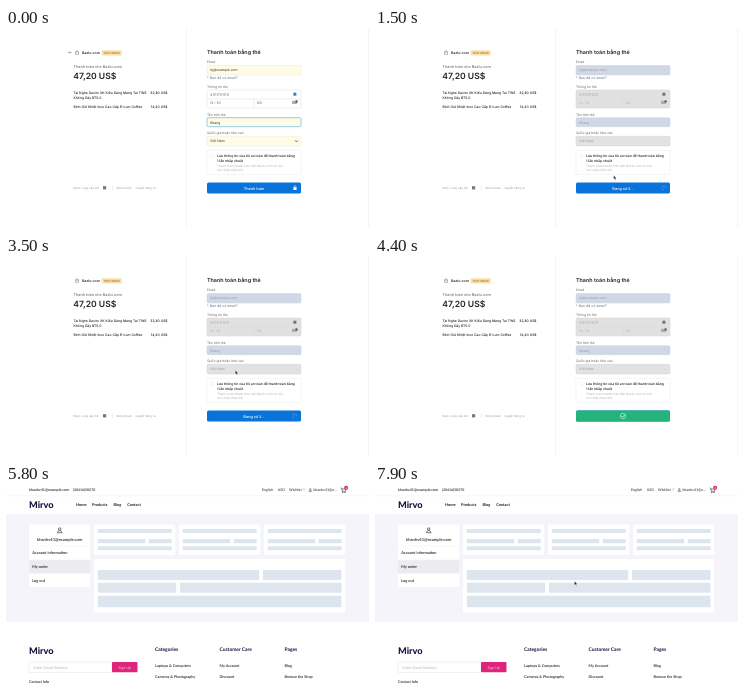
An HTML page that plays this animation: 363 by 200 pixels, repeating every 8 s.

```html
<!DOCTYPE html>
<html lang="vi">
<head>
<meta charset="utf-8">
<title>Checkout</title>
<style>
html, body { margin: 0; width: 100%; height: 100%; overflow: hidden; background: #fff; }
svg { display: block; width: 363px; height: 200px; text-rendering: geometricPrecision; }
#pay { font-family: Inter, "Noto Sans", sans-serif; }
#shop { font-family: Lato, "Open Sans", sans-serif; }
</style>
</head>
<body>
<svg id="stage" viewBox="0 0 363 200" xmlns="http://www.w3.org/2000/svg"></svg>
<script>
const LOOP = 8000, STEP = 100;

const text = (x, y, size, str, fill = '#222', weight = 400, anchor = 'start') =>
  `<text x="${x}" y="${y}" font-size="${size}" fill="${fill}" font-weight="${weight}" text-anchor="${anchor}">${str.replace(/&/g, '&amp;')}</text>`;
const box = (x, y, w, h, fill, extra = '') =>
  `<rect x="${x}" y="${y}" width="${w}" height="${h}" fill="${fill}" ${extra}/>`;
const line = (d, stroke, width = .5, extra = '') =>
  `<path d="${d}" fill="none" stroke="${stroke}" stroke-width="${width}" ${extra}/>`;
const group = (id, body, extra = '') => `<g id="${id}" ${extra}>${body}</g>`;

// Checkout page
const field = (y, h, fill, stroke, width = .5) =>
  box(201, y, 94, h, fill, `rx="1.2" stroke="${stroke}" stroke-width="${width}"`);
const button = fill => box(201, 154.6, 94, 10.8, fill, 'rx="1.5"');

function fields(off) {
  const ink = off ? '#969ca8' : '#333';
  const auto = off ? '#d0d8e6' : '#fffce6';
  const plain = off ? '#e1e1e1' : '#fff';
  const edge = off ? '#cdd2da' : '#e6e6dc';
  return field(37.5, 9.5, auto, edge) +
    text(204, 43.3, 3.4, 'lq@example.com', ink) +
    field(62, 18, plain, off ? '#d2d2d2' : '#dedede') +
    line('M201 71H295M248 71V80', off ? '#d4d4d4' : '#dedede') +
    text(204, 67.5, 3.5, '4111111111111', off ? '#a2a2a2' : '#666') +
    text(204, 76.4, 3.3, '12 / 30', off ? '#b0b0b0' : '#555') +
    text(250.5, 76.4, 3.3, '123', off ? '#b0b0b0' : '#555') +
    box(287.4, 64.7, 3, 3, off ? '#6d747d' : '#3479d2') +
    box(286, 72.8, 5, 3.2, '#a9aeb5', 'rx=".5"') +
    `<circle cx="290.6" cy="73.4" r="1.2" fill="#555b65"/>` +
    field(89.7, 9, auto, off ? edge : '#8cc6e2', off ? .5 : .9) +
    text(204, 95.5, 3.4, 'Khang', ink) +
    field(108.3, 9.6, off ? '#e2e2e2' : '#fffce6', edge) +
    text(204, 114.4, 3.4, 'Việt Nam', ink) +
    line('M289 112.4l1.4 1.5 1.4-1.5', off ? '#cfcfcf' : '#333', .7);
}

const lock = box(287.4, 159.3, 3.2, 2.6, '#fff', 'rx=".4"') + line('M288.1 159.5v-1a.9 .9 0 0 1 1.8 0v1', '#fff', .5);

const pay = box(0, 0, 363, 200, '#fff') +
  line('M180.5 0V200M362.5 0V200', '#f5f5f5', 1) +
  group('back', line('M66 24.5h-3.4m1.3-1.3l-1.3 1.3 1.3 1.3', '#777', .5)) +
  line('M69.5 24.2h3v2.2h-3zM69.5 24.2l.5-1.2h2l.5 1.2', '#777', .5) +
  text(76, 26, 3.5, 'Bazlu.com', '#333', 600) +
  box(95.7, 22.2, 20, 5.4, '#f9dfa8', 'rx="1.2"') +
  text(105.7, 25.9, 2.8, 'TEST MODE', '#a5794a', 600, 'middle') +
  text(67.5, 40, 3.8, 'Thanh toán cho Bazlu.com', '#707070', 500) +
  text(67.3, 50.8, 8.6, '47,20 US$', '#222', 600) +
  text(67.5, 66, 3.38, 'Tai Nghe Daviro XK Kiểu Dáng Mang Tai TWS', '#222', 500) +
  text(67.5, 71.2, 3.38, 'Không Dây BT5.0', '#222', 500) +
  text(161.5, 66, 3.38, '32,80 US$', '#222', 500, 'end') +
  text(67.5, 80, 3.38, 'Bình Giữ Nhiệt Inox Cao Cấp R-Lum Coffee', '#222', 500) +
  text(161.5, 80, 3.38, '14,40 US$', '#222', 500, 'end') +
  text(67.5, 161, 2.85, 'Được cung cấp bởi', '#999') +
  box(97, 158.2, 3.2, 3.2, '#777') +
  line('M106.5 157.5V162', '#ddd') +
  text(110.5, 161, 2.85, 'Điều khoản', '#999') +
  text(129.5, 161, 2.85, 'Quyền riêng tư', '#999') +
  text(201, 26.3, 5.4, 'Thanh toán bằng thẻ', '#222', 600) +
  text(201, 35.2, 3.3, 'Email', '#666') +
  text(201, 50.8, 3.5, '* Bạn đã có email?', '#617a92') +
  text(201, 59.6, 3.3, 'Thông tin thẻ', '#666') +
  text(201, 87.5, 3.3, 'Tên trên thẻ', '#666') +
  text(201, 106, 3.4, 'Quốc gia hoặc khu vực', '#666') +
  group('live', fields(false)) + group('off', fields(true)) +
  field(122.3, 24.2, '#fff', '#ebebeb') +
  box(204.5, 126, 3.6, 3.6, '#fff', 'rx=".8" stroke="#ebebeb" stroke-width=".5"') +
  text(211, 129.2, 3.35, 'Lưu thông tin của tôi an toàn để thanh toán bằng', '#333', 600) +
  text(211, 134, 3.35, '1 lần nhấp chuột', '#333', 600) +
  text(211, 139, 3.1, 'Thanh toán nhanh hơn trên Bazlu.com và mọi', '#b0b0b0') +
  text(211, 143.2, 3.1, 'nơi chấp nhận thẻ.', '#b0b0b0') +
  box(200.4, 154.4, 95.2, 12.2, '#93acd0', 'id="shade" rx="1.8"') +
  button('#0a73da') +
  group('ask', text(248, 161.5, 3.8, 'Thanh toán', '#fff', 500, 'middle')) +
  group('wait', text(248, 161.5, 3.8, 'Đang xử lí...', '#fff', 500, 'middle')) +
  group('lock', lock) +
  group('spin', line('M289 158a2.1 2.1 0 1 1 -2.1 2.1', '#68a9ea', .5)) +
  group('done', button('#24b27d') +
    '<circle cx="248" cy="160" r="2.7" fill="none" stroke="#d9f5e9" stroke-width=".6"/>' +
    line('M246.6 160.1l1.1 1.1 2-2.3', '#fff', .7, 'id="tick" pathLength="1" stroke-dasharray="1"'));

// Shop page
const NAVY = '#11123f', BONE = '#dde6ee';
const card = (x, y, w, h) => box(x, y, w, h, '#fff', 'rx=".8"');
const bones = list => list.map(([x, y, w, h]) => box(x, y, w, h, BONE, 'rx=".8"')).join('');
const person = (x, y, s) =>
  `<g transform="translate(${x} ${y}) scale(${s})" fill="none" stroke="#333" stroke-width=".7"><circle cy="-1.2" r="1.3"/><path d="M-2.4 2.7c0-3 4.8-3 4.8 0z"/></g>`;
const column = (x, head, ...items) => text(x, 167, 4.9, head, NAVY, 700) +
  items.map((s, i) => text(x, 183.4 + i * 10.7, 3.75, s, '#222', 600)).join('');
const cardX = [88, 173, 258];

const shop = box(0, 0, 363, 200, '#fff') +
  text(23, 7.2, 3.65, 'khanhv41@example.com', '#222', 600) +
  text(67, 7.2, 3.5, '(20416)58370', '#222', 600) +
  text(256, 7.2, 3.6, 'English', '#222') + text(271.8, 7.2, 3.5, 'USD', '#222') +
  text(283, 7.2, 3.6, 'Wishlist ♡', '#222') + person(304.3, 6, .6) +
  text(307.5, 7.2, 3.6, 'khanhv41@e...', '#222') +
  line('M334.6 4h1l.8 3.4h3l.7-2.4h-4', '#333', .6) +
  '<circle cx="336.8" cy="8.6" r=".5"/><circle cx="339" cy="8.6" r=".5"/>' +
  '<circle cx="340.1" cy="3.7" r="2" fill="#e02a55"/>' + text(340.1, 4.7, 2.6, '2', '#fff', 700, 'middle') +
  line('M0 11.8H363', '#f0f0f3', .5) +
  text(23, 24, 9.2, 'Mirvo', NAVY, 800) +
  [[70, 'Home'], [86, 'Products'], [107.5, 'Blog'], [121.2, 'Contact']]
    .map(([x, s]) => text(x, 22.3, 3.9, s, '#222', 700)).join('') +
  box(0, 30, 363, 108, '#f4f4fa') +
  card(23, 40.5, 61.3, 62.5) + person(53.7, 46.2, .95) +
  text(53.7, 56.8, 4.1, 'khanhv41@example.com', '#222', 600, 'middle') +
  box(23, 76.2, 61.3, 13, '#ececef') +
  line('M23 62H84.3M23 76H84.3M23 89.3H84.3', '#ececf0', .5) +
  text(26.2, 70, 3.9, 'Account information', '#222', 600) +
  text(26.2, 83.8, 3.9, 'My order', '#222', 600) +
  text(26.2, 97.6, 3.9, 'Log out', '#222', 600) +
  cardX.map(x => card(x, 40.5, 81.3, 30.5)).join('') + card(88, 75, 251.3, 53.5) +
  group('bones',
    cardX.map(x => bones([[x + 3.7, 45, 74, 4], [x + 3.7, 55, 47.5, 4.2], [x + 54.7, 55, 23, 4.2], [x + 3.7, 62.3, 74, 4]])).join('') +
    bones([[91.8, 86, 161.4, 10], [257, 86, 78.5, 10], [91.8, 98.8, 78.4, 10], [174, 98.8, 161.5, 10], [91.8, 111.7, 243.7, 11.6]])) +
  text(23, 169.8, 9.2, 'Mirvo', NAVY, 800) +
  box(23, 178, 83, 10.2, '#fff', 'stroke="#e3e3e8" stroke-width=".5"') +
  text(27.5, 184.5, 3.9, 'Enter Email Address', '#b2b5c6') +
  box(106, 178, 25.5, 10.3, '#df247c', 'rx=".8"') +
  text(118.7, 184.5, 3.6, 'Sign Up', '#fbd3e5', 400, 'middle') +
  text(23, 199, 3.7, 'Contact Info', '#222', 600) +
  column(149, 'Categories', 'Laptops & Computers', 'Cameras & Photography') +
  column(213.5, 'Customer Care', 'My Account', 'Discount') +
  column(278.5, 'Pages', 'Blog', 'Browse the Shop');

const arrow = group('arrow', '<path d="M0 0V3.7L.9 2.9 1.6 4.4 2.2 4.1 1.6 2.7H2.7Z" fill="#111" stroke="#fff" stroke-width=".3"/>');
const hand = group('hand', '<path d="M-.4-2.2h.8V0l1.6.4v1.6L1.4 2.6h-2L-1.8 .8l.5-.4.9.6z" fill="#fff" stroke="#345" stroke-width=".2"/>');

const stage = document.getElementById('stage');
stage.innerHTML = group('pay', pay) + group('shop', shop) + arrow + hand;
const el = id => document.getElementById(id);
const ramp = (t, a, b) => Math.min(1, Math.max(0, (t - a) / (b - a)));
const ease = p => p * p * (3 - 2 * p);
const fade = (id, v) => el(id).setAttribute('opacity', +v);
const move = (id, x, y) => el(id).setAttribute('transform', `translate(${x} ${y})`);

function draw(t) {
  const onShop = t >= 5200;
  fade('pay', !onShop);
  fade('shop', onShop);

  const dim = ramp(t, 100, 500);
  fade('back', t < 100);
  fade('live', dim < 1);
  fade('off', dim);
  fade('shade', .7 * ramp(t, 100, 400) * (1 - ramp(t, 1000, 1400)));
  fade('ask', 1 - dim);
  fade('wait', ramp(t, 500, 1100));
  fade('lock', 1 - ramp(t, 700, 1000));
  fade('spin', ramp(t, 800, 1000));
  el('spin').setAttribute('transform', `rotate(${t * .36} 289 160.1)`);
  fade('done', ramp(t, 3700, 4000));
  el('tick').setAttribute('stroke-dashoffset', 1 - ease(ramp(t, 3900, 4300)));

  // Pulse: opacity 1 to .5 and back every two seconds
  const phase = Math.max(0, t - 5800) / 2000 * Math.PI * 2;
  fade('bones', .75 + .25 * Math.cos(phase));

  const p = ease(ramp(t, 1200, 2100));
  fade('hand', t >= 100 && t < 1300);
  move('hand', 242, 160);
  fade('arrow', (t >= 1300 && t < 3700) || t >= 5900);
  if (onShop) move('arrow', 199.5, 97.3);
  else move('arrow', 242 - 12.6 * p, 159 - 44.4 * p);
}

const start = performance.now();
function tick() {
  const t = (performance.now() - start) % LOOP;
  draw(Math.floor(t / STEP) * STEP);
  requestAnimationFrame(tick);
}
tick();
</script>
</body>
</html>
```
